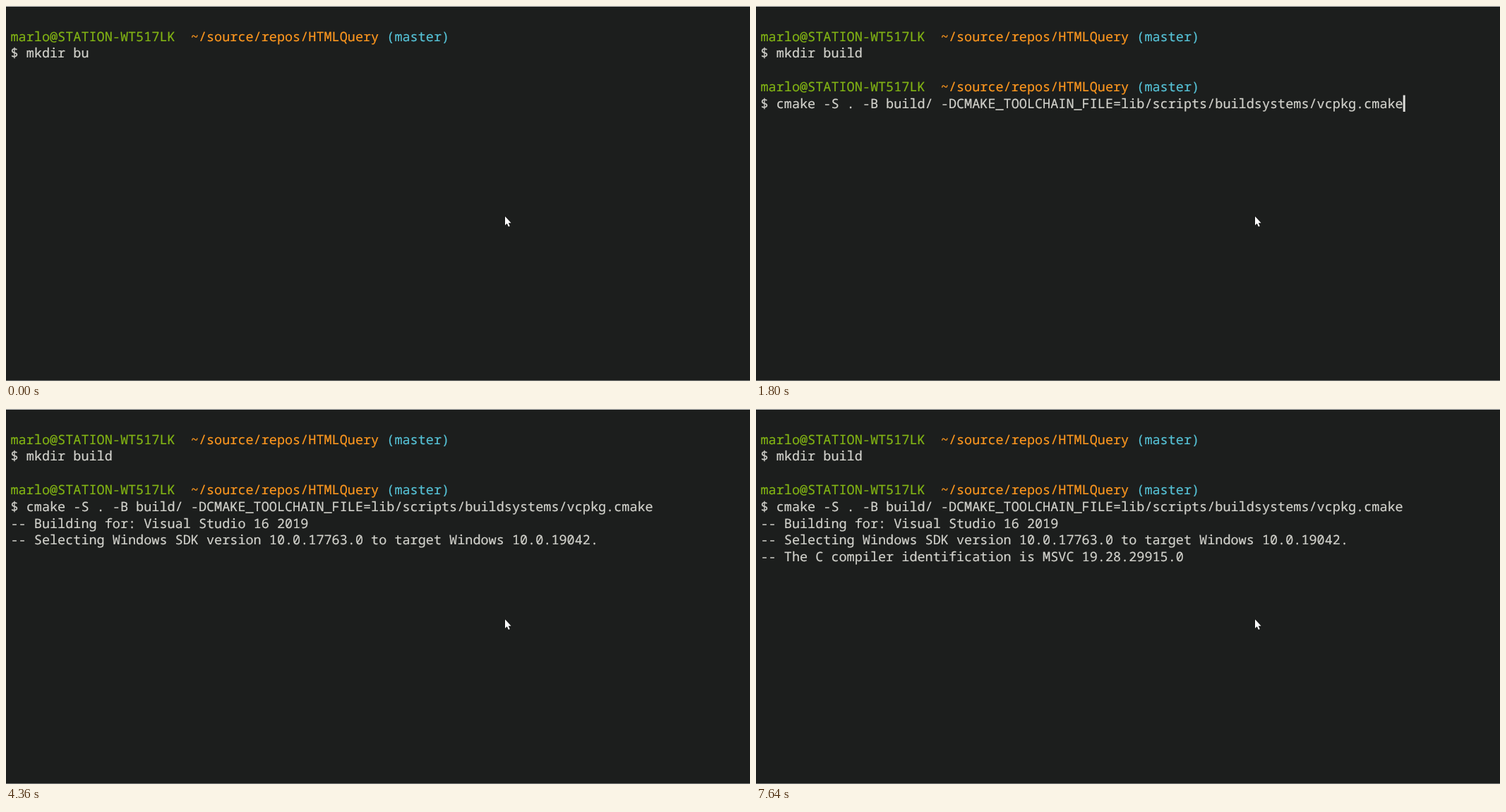
These frames come from a looping animation (1054x532 px, 8 s). An HTML page:

```html
<!DOCTYPE html>
<html lang="en">
<head>
<meta charset="utf-8">
<title>Terminal session</title>
<style>
  html, body { margin: 0; width: 100%; height: 100%; overflow: hidden; background: #1c1e1d; }
  svg { display: block; width: 1054px; height: 532px; }
  text {
    font: 18.5px "Noto Sans Mono", "DejaVu Sans Mono", monospace;
    font-variant-ligatures: none;
    text-rendering: geometricPrecision;
    white-space: pre;
    stroke-width: 0.2px;
  }
</style>
</head>
<body>
<svg viewBox="0 0 1054 532" xmlns="http://www.w3.org/2000/svg">
  <rect width="1054" height="532" fill="#1c1e1d"/>
  <rect width="1054" height="1" fill="#c4c5c4"/>
  <rect y="531" width="1054" height="1" fill="#777877"/>
  <g id="screen"></g>
  <rect id="caret" width="3" height="23.5" fill="#dededa"/>
  <path d="M707 298.5V311L709.8 308.4L711.8 313L713.8 312.2L711.8 307.7H715.6Z"
        fill="#fff" stroke="#0c0d0d" paint-order="stroke"/>
</svg>
<script>
const LOOP = 8000, BLINK = 523;
const CELL = 11.1, ROW = 23.78, LEFT = 6.5, TOP = 31.4, ASCENT = 18.3;
const GREEN = "#82b414", ORANGE = "#fd971f", CYAN = "#56c2d6", PLAIN = "#d2d2cc";

const screen = document.getElementById("screen");
const caret = document.getElementById("caret");
const writes = [];
let row = 0, col = 0;

const xAt = col => LEFT + col * CELL;
const yAt = row => TOP + row * ROW;

function addRun(text, color) {
  const el = document.createElementNS("http://www.w3.org/2000/svg", "text");
  el.setAttribute("x", xAt(col));
  el.setAttribute("y", yAt(row) + ASCENT);
  el.setAttribute("fill", color);
  el.setAttribute("stroke", color);
  el.textContent = text;
  screen.append(el);
  return el;
}

// Writes text at time `at`; the write position advances as on a terminal.
function write(at, text, color = PLAIN) {
  const els = [];
  text.split("\n").forEach((part, i) => {
    if (i) { row++; col = 0; }
    if (part.trim()) els.push(addRun(part, color));
    col += part.length;
  });
  writes.push({ at, els, x: xAt(col), y: yAt(row) });
}

function prompt(at) {
  write(at, "marlo@STATION-WT517LK  ", GREEN);
  write(at, "~/source/repos/HTMLQuery ", ORANGE);
  write(at, "(master)\n", CYAN);
}

// The first lines were written one blink earlier, so the caret starts hidden.
prompt(-BLINK);
write(-BLINK, "$ mkdir bu");
write(80, "i");
write(280, "ld");
write(440, "\n");
write(740, "\n");
prompt(740);
write(770, "$ ");
write(1800, "cmake -S . -B build/ -DCMAKE_TOOLCHAIN_FILE=lib/scripts/buildsystems/vcpkg.cmake");
write(2680, "\n");
write(2740, "-- Building for: Visual Studio 16 2019\n");
write(2770, "-- Selecting Windows SDK version 10.0.17763.0 to target Windows 10.0.19042.\n");
write(6070, "-- The C compiler identification is MSVC 19.28.29915.0\n");

const show = (el, on) => { el.style.display = on ? "" : "none"; };

function draw(t) {
  for (const { at, els } of writes) els.forEach(el => show(el, t >= at));
  // The caret follows the latest write and restarts its blink there.
  const last = writes.findLast(w => t >= w.at);
  caret.setAttribute("x", last.x);
  caret.setAttribute("y", last.y);
  show(caret, Math.floor((t - last.at) / BLINK) % 2 === 0);
}

const start = performance.now();
function tick() {
  draw((performance.now() - start) % LOOP);
  requestAnimationFrame(tick);
}
tick();
</script>
</body>
</html>
```
